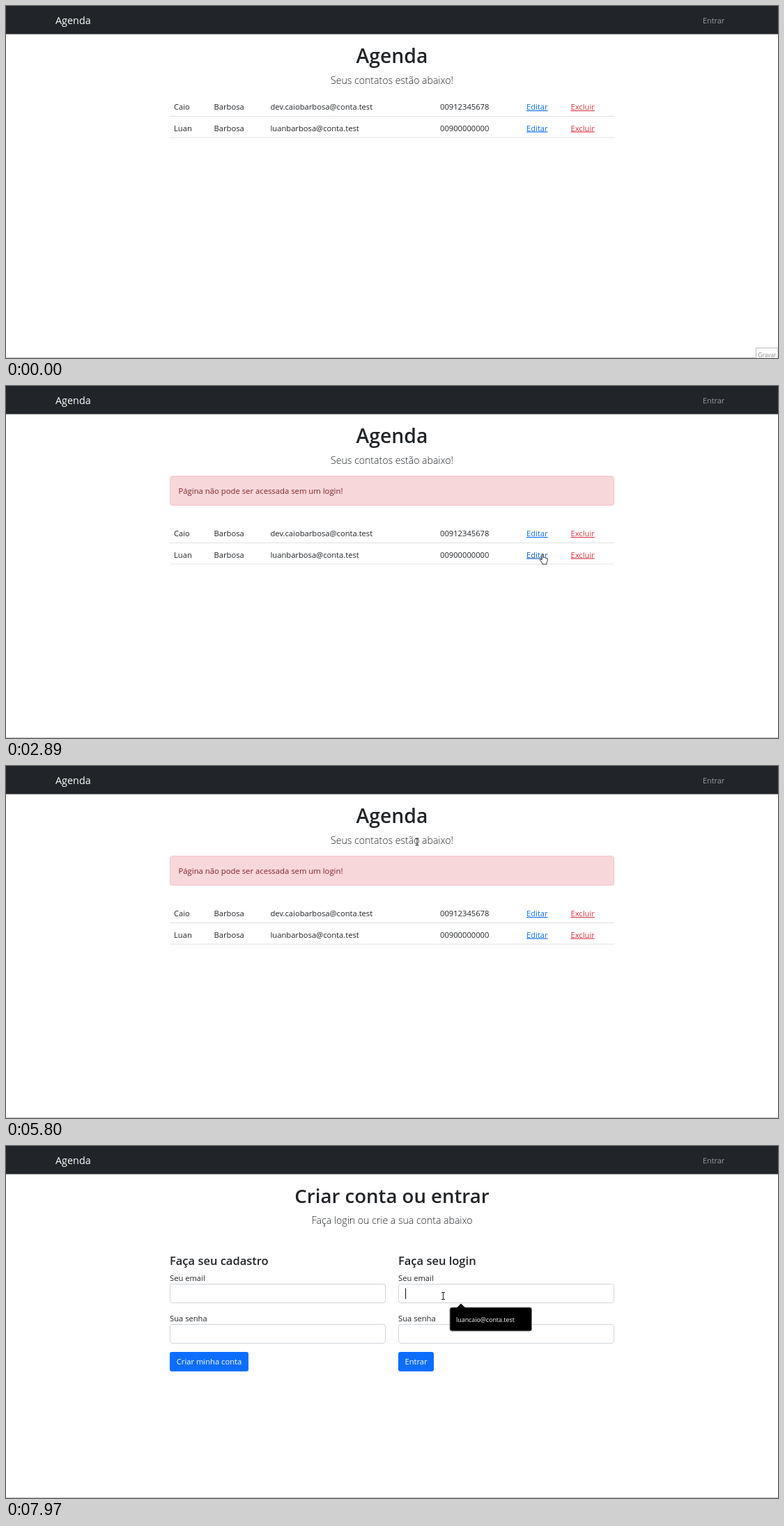
An HTML page that plays this animation: 1108 by 506 pixels, repeating every 8 s.

```html
<!DOCTYPE html>
<html lang="pt-BR">
<head>
<meta charset="utf-8">
<title>Agenda</title>
<style>
html, body { margin: 0; width: 100%; height: 100%; overflow: hidden; background: #fff; }
svg { display: block; width: 100%; height: 100%; }
text { font: 11.2px "Open Sans", "Noto Sans", sans-serif; fill: #212529; white-space: pre; }
.mid { text-anchor: middle; }
.h1 { font-size: 28.3px; font-weight: 600; }
.h1.long { font-size: 27.6px; }
.h2 { font-size: 16.5px; font-weight: 600; }
.lead { font-size: 14.1px; font-weight: 300; }
.brand { font-size: 14.4px; fill: #fff; }
.nav { font-size: 10.9px; fill: #9b9d9f; }
.nav.hover { fill: #d3d4d5; }
.link { fill: #0d6efd; text-decoration: underline; }
.link.hover { fill: #0a58ca; }
.del { fill: #dc3545; text-decoration: underline; }
.del.hover { fill: #b02a37; }
.alert { font-size: 11.3px; fill: #842029; }
.white { fill: #fff; }
.small { font-size: 8.9px; fill: #fff; }
.tip { font-size: 8.25px; fill: #8c8c8c; }
.line { stroke: #dee2e6; }
.field { fill: #fff; stroke: #ced4da; }
.cursor path { fill: #fff; stroke: #222; stroke-width: .9; stroke-linejoin: round; }
.cursor .beam { fill: none; stroke-width: 1; }
</style>
</head>
<body>
<svg viewBox="0 0 1108 506" preserveAspectRatio="none">
  <defs><clipPath id="picked"><rect id="pickClip" x="248" y="141" width="0" height="19"/></clipPath></defs>
  <rect width="1108" height="40.5" fill="#212529"/>
  <path d="M0 505.5H1108" stroke="#c6c6c6"/>
  <g id="bar"></g>
  <g id="list"></g>
  <g id="warn"></g>
  <g id="table"></g>
  <g id="login"></g>
  <g id="menu"></g>
  <g id="tip"></g>
  <circle id="ring" r="9" fill="#f7e74a" fill-opacity=".9"/>
  <g id="cursor" class="cursor">
    <path id="arrow" d="M0 0V10.3L2.5 8.1 4.2 12 6 11.2 4.4 7.4H7.4Z"/>
    <path id="hand" d="M-1 9V1Q0 -1 1 1V5.4Q3 4.6 3.3 6Q5 5.2 5.3 6.6Q7 6 7 8V10.5L5.8 13.3V15H-.4V13.6L-3.8 9.2Q-4 6.5 -1 9Z"/>
    <path id="beam" class="beam" d="M-2.5 -5H2.5M0 -5V5M-2.5 5H2.5"/>
  </g>
</svg>
<script>
const $ = id => document.getElementById(id);
const LOOP = 8000;

function add(parent, tag, attrs, text) {
  const el = document.createElementNS("http://www.w3.org/2000/svg", tag);
  for (const k in attrs) el.setAttribute(k, attrs[k]);
  if (text) el.textContent = text;
  return $(parent).appendChild(el);
}
const label = (parent, x, y, text, cls = "") => add(parent, "text", { x, y, class: cls }, text);
const box = (parent, x, y, width, height, attrs) =>
  add(parent, "rect", { x, y, width, height, rx: 3, ...attrs });

// Navigation bar
label("bar", 71, 25.5, "Agenda", "brand");
const enter = label("bar", 1000, 24.5, "Entrar", "nav");

// Contact list
label("list", 554, 82, "Agenda", "h1 mid");
label("list", 554, 111.5, "Seus contatos estão abaixo!", "lead mid");
const rows = [
  ["Caio", "Barbosa", "dev.caiobarbosa@conta.test", "00912345678"],
  ["Luan", "Barbosa", "luanbarbosa@conta.test", "00900000000"]
].map((cells, i) => {
  const y = 149 + i * 30.5;
  cells.forEach((c, j) => label("table", [241, 298.5, 379.5, 623][j], y, c));
  add("table", "path", { d: `M235 ${158.5 + i * 30.5}h638`, class: "line" });
  return {
    edit: label("table", 747, y, "Editar", "link"),
    del: label("table", 810.5, y, "Excluir", "del")
  };
});

// Warning with its selection
const notice = "Página não pode ser acessada sem um login!";
box("warn", 235.5, 129.5, 637, 42, { fill: "#f8d7da", stroke: "#f5c2c7" });
label("warn", 247.5, 155.3, notice, "alert");
add("warn", "g", { id: "pick", "clip-path": "url(#picked)" });
add("pick", "rect", { x: 248, y: 141, width: 236, height: 19, fill: "#3160cf" });
label("pick", 247.5, 155.3, notice, "alert white");

// Sign-up and login forms
label("login", 554, 82, "Criar conta ou entrar", "h1 long mid");
label("login", 554, 111.5, "Faça login ou crie a sua conta abaixo", "lead mid");
function form(x, title, action, width) {
  label("login", x, 170.5, title, "h2");
  ["Seu email", "Sua senha"].forEach((name, i) => {
    label("login", x, 193.8 + i * 58, name);
    box("login", x + .5, 198.5 + i * 58, 309, 27, { class: "field" });
  });
  box("login", x, 296, width, 28, { fill: "#0d6efd" });
  label("login", x + width / 2, 314.3, action, "mid white");
}
form(235, "Faça seu cadastro", "Criar minha conta", 113);
form(563, "Faça seu login", "Entrar", 51);

// Autofill menu and caret
add("menu", "path", { d: "M573.5 204.5V220", stroke: "#212529", "stroke-width": 1.2 });
box("menu", 637, 232, 117.5, 34, { fill: "#000", stroke: "#8a8a8a" });
add("menu", "path", { d: "M646.5 233L653 226.5 659.5 233Z", fill: "#000" });
label("menu", 646, 252.5, "luancaio@conta.test", "small");

// Corner hint
add("tip", "path", { d: "M1076.5 506V491.5H1108V506", fill: "#fff", stroke: "#bdbdbd" });
label("tip", 1079.5, 504.5, "Gravar", "tip");

// Spans in which the pointer moves; it rests between them
const spans = [
  [320, 1120], [1190, 1940], [2010, 2680], [2830, 3360], [3880, 4650],
  [4720, 5470], [5540, 5600], [5800, 6550], [6620, 7410], [7480, 7970]
];
// time, x, y
const path = [
  [320, 1017, 490], [820, 826, 268], [1050, 780, 219], [1260, 783, 205],
  [1390, 786, 191], [1740, 825, 178], [2010, 826, 178], [2330, 795, 220],
  [2600, 770, 241], [2895, 770, 241], [2960, 778, 248], [3290, 1002, 103],
  [3360, 992, 97], [3880, 975, 102], [4300, 420, 218], [4510, 260, 183],
  [4650, 232, 158], [4850, 247, 150], [5130, 533, 163], [5270, 582, 172],
  [5470, 593, 176], [5600, 576, 113], [5800, 590, 109], [6120, 850, 52],
  [6400, 1011, 17], [6640, 1013, 17], [6900, 905, 120], [7240, 555, 285],
  [7410, 482, 303], [7680, 615, 205], [7760, 627.5, 215.5]
];
const shapes = [
  [0, "arrow"], [1660, "hand"], [2000, "arrow"], [2480, "hand"], [2940, "arrow"],
  [4840, "beam"], [5060, "arrow"], [5590, "beam"], [5860, "arrow"], [6390, "hand"],
  [6540, "arrow"], [7610, "beam"]
];
const clicks = [[1870, 2000], [2540, 2670], [4850, 5530], [6470, 6610], [7750, 7890]];

const within = (t, a, b) => t >= a && t < b;
const show = (id, on) => { $(id).style.display = on ? "" : "none"; };

// The screen refreshes about fifteen times a second
function snap(t) {
  let last = 0;
  for (const [a, b] of spans) {
    if (t < a) break;
    const step = (b - a) / Math.round((b - a) / 67);
    last = Math.min(b, a + Math.floor((t - a + 6) / step) * step);
  }
  return last;
}

function pointAt(t) {
  const i = path.findIndex(p => p[0] > t);
  if (i < 1) return path[i ? path.length - 1 : 0].slice(1);
  const [t0, x0, y0] = path[i - 1], [t1, x1, y1] = path[i];
  const k = (t - t0) / (t1 - t0);
  return [x0 + (x1 - x0) * k, y0 + (y1 - y0) * k];
}

function draw(t) {
  const s = snap(t);
  const [x, y] = pointAt(s);
  const warned = t >= 2010, signing = t >= 6690;

  show("list", !signing);
  show("table", !signing);
  show("warn", warned && !signing);
  show("login", signing);
  show("menu", t >= 7820);
  show("tip", t < 130);
  $("tip").style.opacity = t < 70 ? 1 : .5;
  $("table").setAttribute("transform", `translate(0 ${warned ? 67 : 0})`);

  enter.classList.toggle("hover", within(t, 6390, 6690));
  rows[1].del.classList.toggle("hover", within(t, 1660, 2010));
  rows[1].edit.classList.toggle("hover", within(t, 2480, 2940));

  const dragged = within(t, 4850, 5540) ? Math.max(0, Math.min(236, x - 248)) : 0;
  $("pickClip").setAttribute("width", dragged);

  const shape = shapes.filter(p => p[0] <= s + 1).pop()[1];
  for (const id of ["arrow", "hand", "beam"]) show(id, id === shape);
  show("cursor", t >= 320);
  $("cursor").setAttribute("transform", `translate(${x} ${y})`);
  show("ring", clicks.some(([a, b]) => within(t, a, b)));
  $("ring").setAttribute("cx", x);
  $("ring").setAttribute("cy", y);
}

const start = performance.now();
function tick() {
  draw((performance.now() - start) % LOOP);
  requestAnimationFrame(tick);
}
tick();
</script>
</body>
</html>
```
